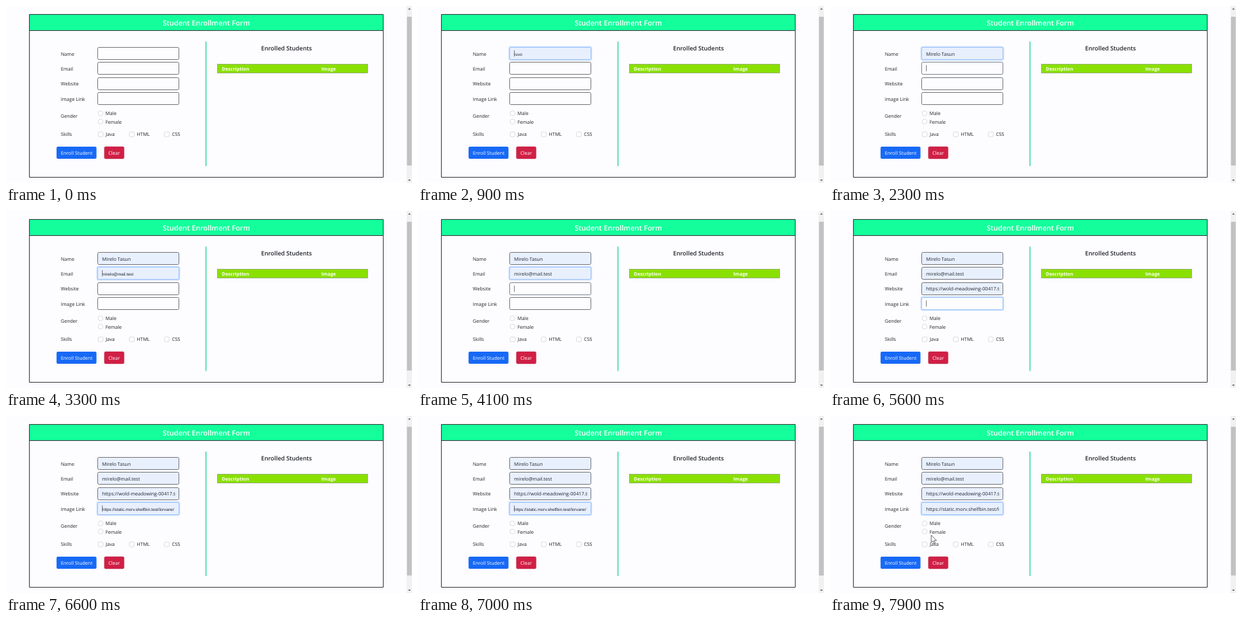
Animation, 600 px wide and 263 px high, one loop 8 s. Source, as an HTML page:

```html
<!DOCTYPE html>
<html lang="en">
<head>
<meta charset="utf-8">
<title>Student Enrollment Form</title>
<style>
html, body { margin: 0; width: 100%; height: 100%; overflow: hidden; background: #fdfcfe; }
svg { display: block; width: 600px; height: 263px; }
text { font: 7.1px "Open Sans", "Noto Sans", sans-serif; fill: #212529; text-rendering: geometricPrecision; }
.preview { font: 6.2px "Liberation Sans", Arial, sans-serif; }
.title { font-size: 10.6px; font-weight: 600; fill: #fff; text-anchor: middle; }
.sub { font-size: 8.8px; font-weight: 600; text-anchor: middle; }
.head { font-size: 7px; font-weight: 700; fill: #fff; }
.button { fill: #fff; }
.option { fill: #fff; stroke: #c4c4c8; stroke-width: .6; }
</style>
</head>
<body>
<svg id="stage" viewBox="0 0 600 263">
  <clipPath id="inner"><rect x="141" y="55" width="109.3" height="100"/></clipPath>
  <rect width="600" height="263" fill="#fdfcfe"/>
  <rect x="34.5" y="12.5" width="523" height="24" fill="#14ff9b"/>
  <path d="M34.5 12.5H557.5V254.5H34.5ZM34.5 36.5H557.5" fill="none" stroke="#3a3a3c"/>
  <path d="M295.5 53.5V237" stroke="#3fdfad" stroke-width="1.7" stroke-linecap="round"/>
  <rect x="312.5" y="86.5" width="222" height="13" fill="#8ae000" stroke="#8b9a70" stroke-width=".7"/>
  <rect x="74.7" y="209" width="59" height="18" rx="2" fill="#1769f5"/>
  <rect x="145.3" y="209" width="29.2" height="18" rx="2" fill="#d02045" stroke="#b02848" stroke-width=".4"/>
  <rect x="592" width="8" height="263" fill="#f1f1f1"/>
  <rect x="592.6" y="16" width="7" height="221" fill="#c1c1c1"/>
  <path d="M594.2 5.2L596.2 3.2 598.2 5.2ZM594.2 258L596.2 260 598.2 258Z" fill="#505050"/>
  <g id="labels"></g>
  <g id="fields"></g>
  <path id="cursor" d="M0 0V11L2.6 8.6 4.4 12.8 6.1 12 4.3 8H7.8Z" fill="#fff" stroke="#333" stroke-width=".7"/>
</svg>
<script>
const LOOP = 8000, TRANSITION = 60;
const $ = id => document.getElementById(id);

function add(parent, tag, attrs, content = "") {
  const el = document.createElementNS("http://www.w3.org/2000/svg", tag);
  for (const key in attrs) el.setAttribute(key, attrs[key]);
  el.textContent = content;
  return parent.appendChild(el);
}
const label = (x, y, content, cls = "") => add($("labels"), "text", { x, y, class: cls }, content);

label(296, 28.6, "Student Enrollment Form", "title");
label(414.5, 66.2, "Enrolled Students", "sub");
label(319, 96, "Description", "head");
label(466, 96, "Image", "head");
label(81, 220.8, "Enroll Student", "button");
label(151.3, 220.8, "Clear", "button");
label(81, 165.6, "Gender");
label(81, 193.4, "Skills");
[["Male", 159.5], ["Female", 171.7]].forEach(([name, y]) => {
  add($("labels"), "circle", { cx: 139.7, cy: y, r: 3.6, class: "option" });
  label(147, y + 2.9, name);
});
[["Java", 136.3], ["HTML", 182.3], ["CSS", 234.2]].forEach(([name, x]) => {
  add($("labels"), "rect", { x, y: 187.2, width: 7, height: 7, rx: 1.4, class: "option" });
  label(x + 11, 193.4, name);
});

// Times in ms: focus and blur, hover over a suggestion, fill it in.
const fields = [
  { name: "Name", value: "Mirelo Tasun", focus: 500, blur: 2295, hover: 800, fill: 1500, first: "ruvo", second: 1200 },
  { name: "Email", value: "mirelo@mail.test", focus: 2295, blur: 4095, hover: 2900, fill: 3400 },
  { name: "Website", value: "https://wold-meadowing-00417.test/", focus: 4095, blur: 5520, hover: 4600, fill: 5000 },
  { name: "Image Link", value: "https://static.morv.shelfbin.test/lorvane/", focus: 5520, blur: LOOP * 2, hover: 6400, fill: 7400 }
];

fields.forEach((f, i) => {
  const y = Math.round(61 + i * 22.4) + .5, baseline = 73.5 + i * 22.35, root = $("fields");
  const box = { x: 135.5, y, width: 120, height: 18, rx: 2, "stroke-width": .8 };
  label(81, baseline, f.name);
  f.glow = add(root, "rect", { x: 133.7, y: y - 1.8, width: 123.6, height: 21.6, rx: 3.6, fill: "#c6ddfd" });
  f.box = add(root, "rect", { ...box, stroke: "#56575c" });
  f.ring = add(root, "rect", { ...box, fill: "none", stroke: "#92bdfc" });
  f.text = add(add(root, "g", { "clip-path": "url(#inner)" }), "text", { x: 142, y: baseline });
  f.caret = add(root, "path", { d: `M142.4 ${y + 4.4}v9.2`, stroke: "#444", "stroke-width": .7 });
});

const clamp = v => Math.max(0, Math.min(1, v));
const easeOut = v => 1 - (1 - clamp(v)) ** 2;

function render(t) {
  for (const f of fields) {
    const glow = clamp((t - f.focus) / TRANSITION) - clamp((t - f.blur) / TRANSITION);
    const hovered = t >= f.hover, filled = t >= f.fill;
    const blinkOn = Math.floor((t - f.focus) / 500) % 2 === 0;
    f.glow.style.opacity = f.ring.style.opacity = glow;
    f.box.style.strokeOpacity = 1 - glow;
    f.box.setAttribute("fill", hovered ? "#e8f0fe" : "#fdfcfe");
    f.text.textContent = !hovered ? "" : t < f.second ? f.first : f.value;
    f.text.setAttribute("class", filled ? "" : "preview");
    f.caret.style.opacity = +(t >= f.focus && t < f.blur && !filled && blinkOn);
  }
  const move = easeOut((t - 7450) / 430);
  $("cursor").style.opacity = +(t >= 7450);
  $("cursor").setAttribute("transform", `translate(${152 - 2.4 * move} ${190 - 13 * move})`);
}

function tick() {
  render(performance.now() % LOOP);
  requestAnimationFrame(tick);
}
tick();
</script>
</body>
</html>
```
